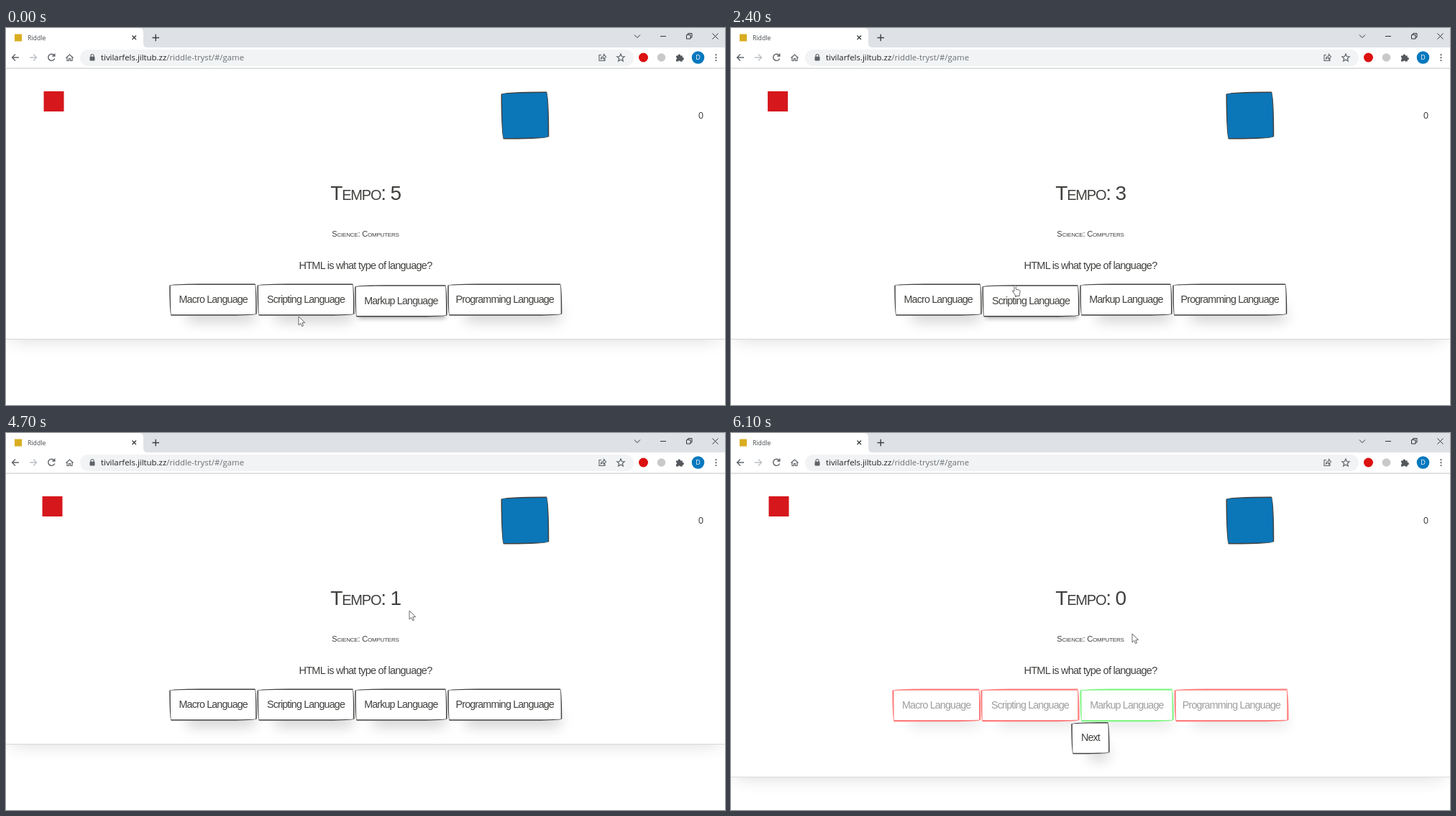
These frames come from a looping animation (1000x524 px, 6200 ms). An HTML page:

```html
<!DOCTYPE html>
<html lang="en">
<head>
<meta charset="utf-8">
<title>Riddle</title>
<style>
html, body { margin: 0; width: 100%; height: 100%; overflow: hidden; background: #fff; }
.page, svg { position: absolute; left: 0; top: 0; }
/* The page is laid out at 4/3 size and shown at 75 % */
.page { width: 1333.4px; transform: scale(.75); transform-origin: 0 0; }
.page div { position: absolute; box-sizing: border-box; }
.card { border-bottom: 1px solid #cdcccb; background: #fff; box-shadow: -1px 5px 35px -9px rgba(0,0,0,.2); }
.sketch {
  border: 2px solid #41403e;
  border-radius: 255px 15px 225px 15px / 15px 225px 15px 255px;
}
.button {
  display: flex; align-items: center; justify-content: center;
  padding-bottom: 1px; background: #fff; color: #41403e; white-space: nowrap;
  font: 19px "Liberation Sans", Arial, sans-serif; letter-spacing: -1.1px;
}
.avatar { background: #0b76b8; }
.ui { font-family: "Open Sans", sans-serif; }
.body { font-family: "Liberation Sans", Arial, sans-serif; fill: #41403e; text-anchor: middle; }
.caps { font-variant: small-caps; }
.icon { fill: none; stroke: #5f6368; stroke-width: 1.4; }
</style>
</head>
<body>
<div class="page" id="page"></div>
<svg width="1000" height="524" viewBox="0 0 1000 524">
  <g class="ui">
    <rect width="1000" height="28" fill="#dee1e6"/>
    <path d="M0 0H185Q191 0 191 6V21Q191 27 197 27V28H0Z" fill="#fff"/>
    <rect y="27" width="1000" height="29" fill="#fff"/>
    <rect y="55.5" width="1000" height="1" fill="#c6c8ca"/>
    <rect x="103" y="30" width="770" height="23" rx="11.5" fill="#f1f3f4"/>
    <rect x="12" y="8.5" width="10" height="10" fill="#d9ad20"/>
    <text x="30" y="17" font-size="8.7" fill="#45484c">Riddle</text>
    <g class="icon">
      <path d="M175.500 10.500l5.500 5.500m0-5.500l-5.500 5.500M203.500 13.500h9.500m-4.750-4.750v9.500" stroke="#3c4043"/>
      <path d="M874 9.500l4 4 4-4M910 11.500h8M982.500 7.500l8 8m0-8l-8 8M946.500 9.500h5.500v5.500h-5.500zM948.500 9.500v-2h5.500v5.500h-2" stroke="#333" stroke-width="1"/>
      <path d="M18 41H8.500m4.500-4.500L8.500 41l4.500 4.500"/>
      <path d="M33 41h9.500m-4.500-4.500l4.500 4.500-4.500 4.500" stroke="#bdc1c6"/>
      <path d="M67 38a4.600 4.600 0 1 0 .6 4.500M67.800 35.500v3.500h-3.500"/>
      <path d="M83.500 41.500l5-4.500 5 4.500M85 40.500v5h2.500v-3h2v3h2.500v-5" stroke-width="1.200"/>
      <path d="M118 40v-1.500a2 2 0 0 1 4 0v1.500" stroke-width="1.200"/>
      <path d="M828 37.500h-3v8h8v-2.500M827.500 43q.3-4 4-4v-2.500l3 3.500-3 3.500v-2.300q-2.500 0-4 1.800z" stroke-width="1.100"/>
      <path d="M855 36l1.500 3.500 3.700.3-2.800 2.500.9 3.700-3.300-2-3.300 2 .9-3.700-2.800-2.500 3.700-.3z" stroke-width="1.200"/>
    </g>
    <rect x="116.500" y="39.800" width="7" height="5.800" rx="1" fill="#5f6368"/>
    <text x="132" y="45" font-size="11.4" fill="#6b6f74"><tspan fill="#202124">tivilarfels.jiltub.zz</tspan>/riddle-tryst/#/game</text>
    <circle cx="886.500" cy="41" r="6.500" fill="#dc1111"/>
    <circle cx="911.500" cy="41" r="5.800" fill="#c9c9c9"/>
    <path d="M932 38.500h2.700a1.700 1.700 0 1 1 3.300 0h2.800v2.700a1.700 1.700 0 1 1 0 3.300v2h-3a1.600 1.600 0 0 0-3 0H932v-2.800a1.600 1.600 0 0 0 0-3z" fill="#54585d"/>
    <circle cx="962.500" cy="41" r="8.800" fill="#0578be"/>
    <text x="962.500" y="44.300" font-size="9" fill="#fff" text-anchor="middle">D</text>
    <path d="M987.500 36.200v9.800" stroke="#5f6368" stroke-width="2" stroke-dasharray="2"/>
  </g>
  <rect id="logo" y="88" width="28" height="28" fill="#d6171c"/>
  <g class="body">
    <text x="966.500" y="126" font-size="12.500">0</text>
    <text id="timer" class="caps" x="500" y="239" font-size="28" letter-spacing="-1.2"></text>
    <text class="caps" x="500" y="289.500" font-size="11" letter-spacing="-.2">Science: Computers</text>
    <text x="500" y="335" font-size="14.500" letter-spacing="-.75">HTML is what type of language?</text>
  </g>
  <g id="cursor" fill="#fff" stroke="#444" stroke-width=".8" stroke-linejoin="round">
    <path id="arrow" d="M0 0V12L2.800 9.500 4.600 13.700 6.500 12.800 4.800 8.800 8.600 8.500Z"/>
    <path id="hand" d="M-1.200 1a1.200 1.200 0 0 1 2.400 0V5.500l4.400 1q1.700.4 1.500 2l-.9 4v2.200H0V13l-3.800-5q.2-1.800 2.600.4z"/>
  </g>
</svg>
<script>
const LOOP = 6200, STEP = 100, FADE = 235, TICK = 1000, REVEAL = 4970;
const SCALE = 0.75, INK = [65, 64, 62], RED = [255, 0, 0], GREEN = [6, 240, 15];
const $ = id => document.getElementById(id);
const page = $('page');

// Left and right edges: while answering, then after the reveal
const answers = [
  { label: 'Macro Language', from: [227.5, 349], to: [224.5, 347], color: RED },
  { label: 'Scripting Language', from: [349.5, 484.5], to: [347.5, 484.5], color: RED },
  { label: 'Markup Language', from: [485.3, 613.5], to: [485.3, 615.5], color: GREEN },
  { label: 'Programming Language', from: [614.5, 773], to: [616.3, 775.8], color: RED }
];
// answer index, pointer in, pointer out
const hovers = [[2, -400, 0], [1, 100, 900], [0, 900, 1800], [1, 1800, 2400]];
// time, x, y
const pointer = [
  [0, 407, 401], [200, 398, 392], [600, 378, 389], [900, 317, 386], [1300, 300, 384],
  [1500, 303, 384], [1800, 369, 386], [2200, 394, 378], [3000, 401, 248],
  [3200, 401, 248], [3900, 561, 247], [5400, 561, 247], [6000, 558, 279]
];
const logoPath = [[0, 27], [900, 30.5], [1800, 26], [3100, 25], [5100, 25], [6100, 27]];

const clamp = v => Math.min(1, Math.max(0, v));
const mix = (a, b, p) => a + (b - a) * p;
const ease = v => 1 - Math.pow(1 - clamp(v), 2.3);
const smooth = p => p * p * (3 - 2 * p);

function along(keys, t) {
  const i = keys.findIndex(k => k[0] > t);
  if (i < 0) return keys[keys.length - 1].slice(1);
  const a = keys[i - 1], b = keys[i];
  const p = smooth((t - a[0]) / (b[0] - a[0]));
  return a.slice(1).map((v, n) => mix(v, b[n + 1], p));
}

function add(className, text = '') {
  const el = document.createElement('div');
  el.className = className;
  el.textContent = text;
  return page.appendChild(el);
}

function place(el, left, top, right, bottom) {
  const px = v => v / SCALE + 'px';
  Object.assign(el.style, {
    left: px(left), top: px(top), width: px(right - left), height: px(bottom - top)
  });
}

function shadow(el, hover) {
  const [x, y, blur, spread] = [[15, 2], [28, 8], [25, 8], [-18, -5]].map(([a, b]) => mix(a, b, hover));
  el.style.boxShadow = `${x}px ${y}px ${blur}px ${spread}px rgba(0,0,0,${mix(0.2, 0.3, hover)})`;
}

function hoverOf(index, t) {
  return Math.max(...hovers.map(([i, start, end]) =>
    i === index ? Math.min(ease((t - start) / FADE), 1 - ease((t - end) / FADE)) : 0));
}

const card = add('card');
place(add('sketch avatar'), 688.5, 88.5, 755, 154.7);
for (const a of answers) a.el = add('sketch button', a.label);
const next = add('sketch button', 'Next');
shadow(next, 0);

function draw(t) {
  const done = t >= REVEAL;
  const p = ease((t - REVEAL) / FADE);

  place(card, 0, 57, 1000, done ? mix(477, 478.5, p) : 433);
  answers.forEach((a, i) => {
    const [left, right] = a.from.map((v, n) => mix(v, a.to[n], p));
    const hover = hoverOf(i, t);
    place(a.el, left, 355.6, right, mix(400, 401.5, p));
    shadow(a.el, hover);
    const s = a.el.style;
    s.transform = `translateY(${hover * 2.4}px)`;
    s.borderWidth = p < 0.7 ? '2px' : '3px';
    s.borderColor = `rgb(${INK.map((v, n) => Math.round(mix(v, a.color[n], p)))})`;
    s.opacity = mix(1, 0.5, p);
  });
  next.style.display = done ? 'flex' : 'none';
  const top = mix(401, 402, p);
  place(next, 473.5, top, 526.5, top + 44.5);

  $('timer').textContent = 'Tempo: ' + Math.max(0, 5 - Math.floor((t + TICK - REVEAL % TICK) / TICK));
  $('logo').setAttribute('x', along(logoPath, t)[0] + 25.5);

  const [x, y] = along(pointer, t);
  const over = !done && x > 228 && x < 772 && y > 356 && y < 400;
  $('cursor').setAttribute('transform', `translate(${x} ${y})`);
  $('arrow').style.display = over ? 'none' : '';
  $('hand').style.display = over ? '' : 'none';
}

const start = performance.now();
function tick() {
  const t = (performance.now() - start) % LOOP;
  draw(Math.floor(t / STEP) * STEP);
  requestAnimationFrame(tick);
}
tick();
</script>
</body>
</html>
```
